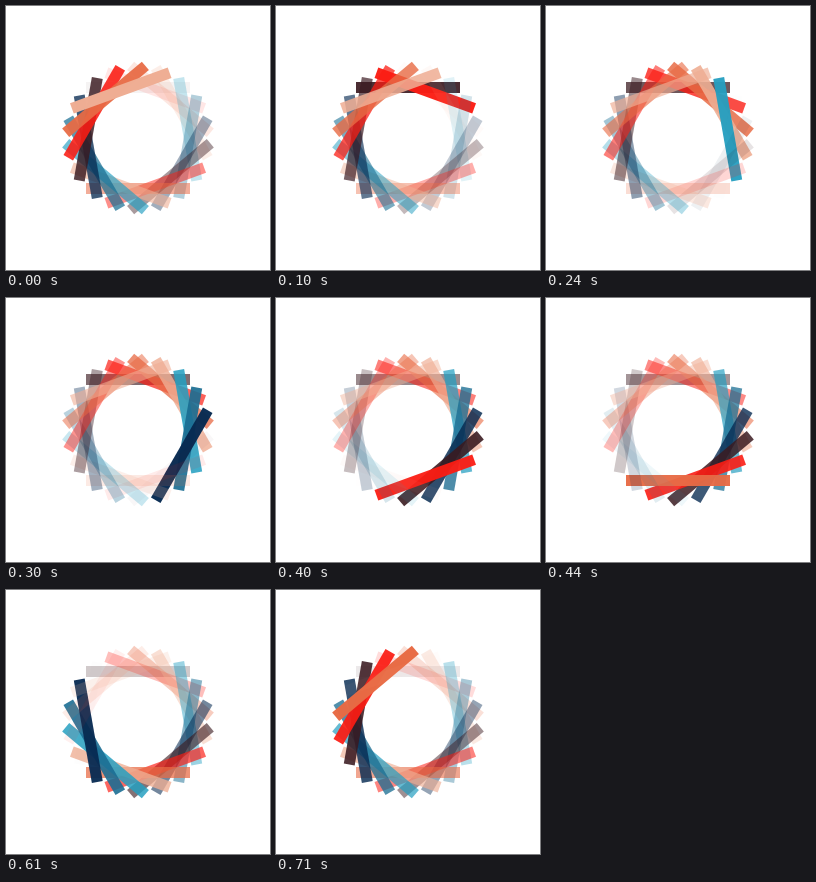
An HTML page for the animation above (740 ms loop, 264 by 264 pixels).

```html
<!DOCTYPE html>
<html lang="en">
<head>
<meta charset="utf-8">
<title>Bar ring</title>
<style>
html, body { margin: 0; width: 100%; height: 100%; overflow: hidden; background: #fff; }
svg { display: block; width: 100vw; height: 100vh; }
</style>
</head>
<body>
<svg viewBox="0 0 264 264"><g id="ring" transform="translate(132 132)"></g></svg>
<script>
const LOOP = 740, STEPS = 22, BARS = 18, LEAD = 1.1;
const COLORS = ['#3a1a20', '#fb1d14', '#e86b45', '#efae94', '#259fc1', '#1b6e93', '#082b52'];
const ring = document.getElementById('ring');

function makeBar(k) {
  const bar = document.createElementNS('http://www.w3.org/2000/svg', 'rect');
  const attrs = {
    x: -52, y: -56, width: 104, height: 11,
    fill: COLORS[k % COLORS.length],
    transform: `rotate(${k * 360 / BARS})`
  };
  for (const name in attrs) bar.setAttribute(name, attrs[name]);
  return ring.appendChild(bar);
}

const bars = Array.from({ length: BARS }, (_, k) => makeBar(k));

// Time advances in 34 ms ticks aligned to 10 ms.
function tick(ms) {
  return Math.ceil((Math.floor(ms / 10) + 1) * 10 / 34) - 1;
}

// Each bar appears at once in its turn, then fades evenly over one loop.
function draw(ms) {
  const n = tick(ms % LOOP);
  bars.forEach((bar, k) => {
    const age = (n - LEAD) / STEPS - k / BARS + 2;
    bar.setAttribute('opacity', (1 - age % 1).toFixed(4));
  });
}

let start;
function loop(now) {
  if (start === undefined) start = now;
  draw(Math.max(0, now - start));
  requestAnimationFrame(loop);
}

draw(0);
requestAnimationFrame(loop);
</script>
</body>
</html>
```
